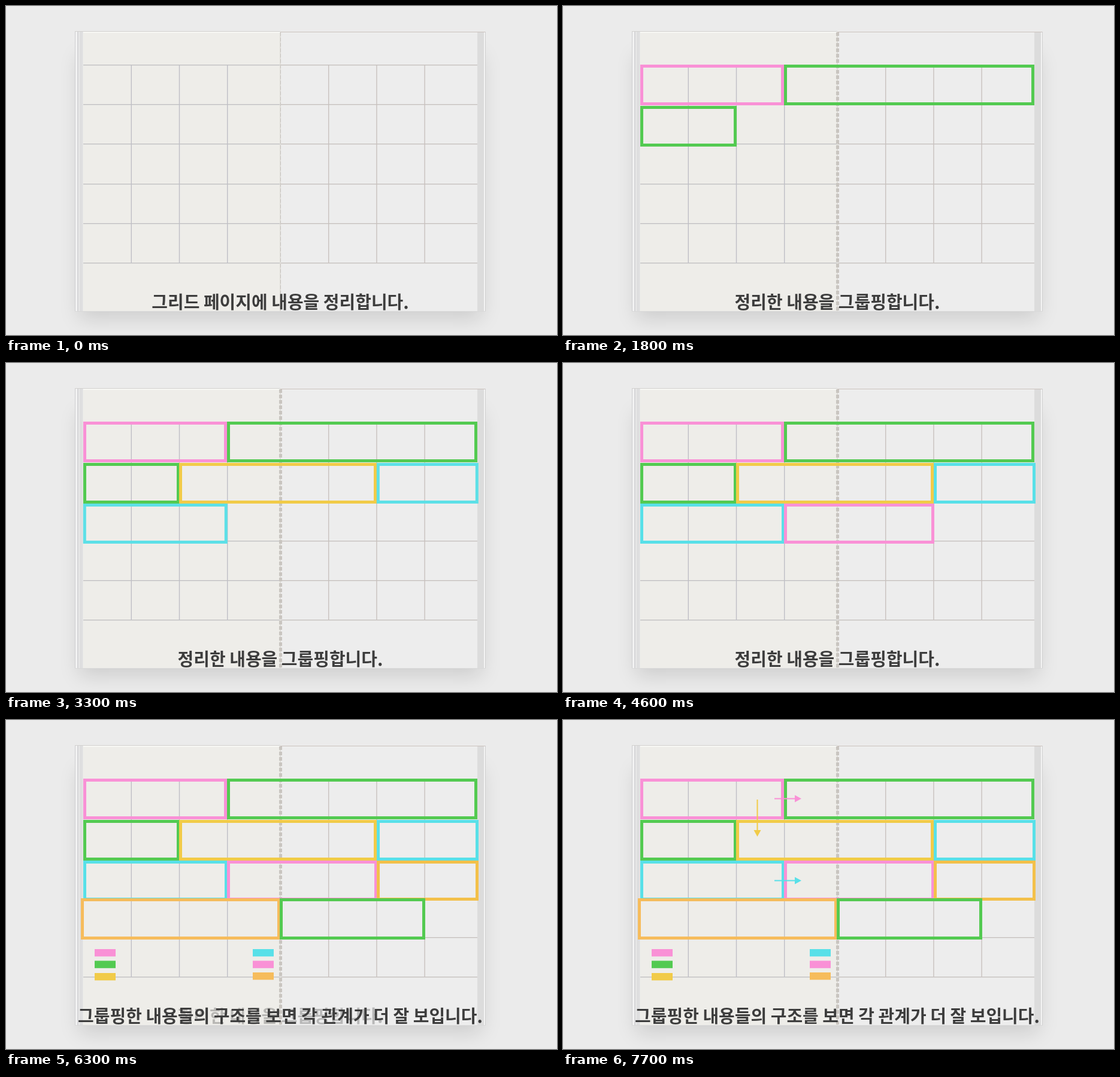
Animation of 920x550 px, one loop 7800 ms. Source, as an HTML page with a canvas:

```html
<!DOCTYPE html>
<html lang="ko">
<head>
<meta charset="utf-8">
<title>그리드 페이지</title>
<style>
  html, body { margin: 0; width: 100%; height: 100%; overflow: hidden; background: #ebebeb; }
  canvas { display: block; width: 920px; height: 550px; }
</style>
</head>
<body>
<canvas id="stage" width="920" height="550"></canvas>
<script>
const ctx = document.getElementById('stage').getContext('2d');
const LOOP = 7800, STEP = 100;
const PINK = '#f991d6', GREEN = '#53ca51', YELLOW = '#f1cb48', GOLD = '#f3c04a',
      ORANGE = '#f6bc5c', CYAN = '#58e0e8';

// Outer edges of each group, with the time it starts to appear
const groups = [
  { start: 500, color: PINK, box: [129, 98, 369, 166], slide: 0 },
  { start: 1200, color: GREEN, box: [369, 98, 787, 166], slide: 5 },
  { start: 1200, color: GREEN, box: [129, 167, 290, 235], slide: 5 },
  { start: 2000, color: YELLOW, box: [289, 167, 619, 235], slide: 5 },
  { start: 2900, color: CYAN, box: [619, 167, 789, 235], slide: 5 },
  { start: 2900, color: CYAN, box: [129, 235, 370, 302], slide: 5 },
  { start: 3750, color: PINK, box: [369, 235, 620, 302], slide: 5 },
  { start: 4600, color: GOLD, box: [619, 235, 789, 302], slide: 5 },
  { start: 4600, color: ORANGE, box: [125, 298, 458, 367], slide: 5 },
  { start: 5350, color: GREEN, box: [457, 298, 700, 367], slide: 5 }
];

const captions = [
  { text: '그리드 페이지에 내용을 정리합니다.', from: -500, to: 100, fade: 500 },
  { text: '정리한 내용을 그룹핑합니다.', from: 100, to: 5950, fade: 500 },
  { text: '그룹핑한 내용들의 구조를 보면 각 관계가 더 잘 보입니다.', from: 5950, to: 9000, fade: 350 }
];

const swatches = [
  [148, 383, PINK], [148, 402.5, GREEN], [148, 423, YELLOW],
  [412, 383, CYAN], [412, 402.5, PINK], [412, 422, ORANGE]
];

const ramp = (t, start, length) => Math.min(1, Math.max(0, (t - start) / length));
const easeOut = p => 1 - (1 - p) ** 2;

function fill(color, x, y, w, h) {
  ctx.fillStyle = color;
  ctx.fillRect(x, y, w, h);
}

function drawPage() {
  fill('#ebebeb', 0, 0, 920, 550);
  ctx.save();
  ctx.shadowColor = 'rgba(0,0,0,0.13)';
  ctx.shadowBlur = 32;
  ctx.shadowOffsetY = 13;
  fill('#e9e9e9', 122, 70, 672, 440);
  ctx.restore();

  // Stacked sheet edges on both sides
  fill('#e8e8e8', 115, 43, 14, 467);
  fill('#cfcfd1', 115, 43, 1, 467);
  fill('#f2f2f2', 116, 43, 3, 467);
  fill('#d5d5d7', 119, 43, 2, 467);
  fill('#dededf', 123, 43, 5, 467);
  fill('#dcdcdc', 787, 43, 11, 467);
  fill('#f3f3f3', 798, 43, 2, 467);
  fill('#cfcfcf', 800, 43, 1, 467);

  fill('#eeede9', 129, 43, 329, 467);
  fill('#ededed', 458, 43, 329, 467);
  fill('#d2d1cf', 115, 42, 343, 1);
  fill('#f7f7f4', 129, 43, 329, 2);
  fill('#cbc2bd', 458, 43, 342, 1);
  fill('#d9d9d9', 115, 510, 686, 1);
}

function drawGrid() {
  for (let i = 0; i < 6; i++) {
    const y = 98 + Math.round(i * 66.2);
    fill('#c1c0c2', 129, y, 329, 1.4);
    fill('#c6c1be', 458, y, 329, 1.4);
  }
  for (let i = 0; i < 3; i++) {
    fill('#bfbfc6', 208.6 + i * 80.2, 99, 1.4, 331);
    fill('#c8c1be', 538 + i * 80.2, 99, 1.4, 331);
  }
  fill('#dedcd8', 457, 44, 2, 466);
  ctx.save();
  ctx.strokeStyle = '#c9c5c0';
  ctx.setLineDash([6, 3]);
  ctx.beginPath();
  ctx.moveTo(458.5, 44);
  ctx.lineTo(458.5, 510);
  ctx.stroke();
  ctx.restore();
}

function drawGroup({ start, color, box, slide }, t) {
  const p = ramp(t, start, 500);
  if (!p) return;
  const [x1, y1, x2, y2] = box;
  const shift = slide * (1 - easeOut(p));
  ctx.globalAlpha = easeOut(p);
  ctx.strokeStyle = color;
  ctx.lineWidth = 5;
  ctx.strokeRect(x1 + 2.5 - shift, y1 + 2.5, x2 - x1 - 5, y2 - y1 - 5);
  ctx.globalAlpha = 1;
}

function drawArrow(x, y, length, angle, color) {
  ctx.save();
  ctx.translate(x, y);
  ctx.rotate(angle);
  fill(color, 0, -1, length - 9, 2);
  ctx.beginPath();
  ctx.moveTo(length, 0);
  ctx.lineTo(length - 11, -6);
  ctx.lineTo(length - 11, 6);
  ctx.fill();
  ctx.restore();
}

function drawArrows(t) {
  ctx.globalAlpha = ramp(t, 6700, 500);
  drawArrow(353, 131.5, 45, 0, PINK);
  drawArrow(324.5, 133, 62, Math.PI / 2, YELLOW);
  drawArrow(353, 268.5, 45, 0, CYAN);
  ctx.globalAlpha = 1;
}

function drawCaption({ text, from, to, fade }, t) {
  const alpha = ramp(t, from, fade) * (1 - ramp(t, to, fade));
  if (!alpha) return;
  ctx.globalAlpha = alpha;
  ctx.fillStyle = '#3d3d3d';
  ctx.fillText(text, 458, 506);
  ctx.globalAlpha = 1;
}

function draw(t) {
  drawPage();
  drawGrid();
  groups.forEach(g => drawGroup(g, t));
  ctx.globalAlpha = ramp(t, 5900, 300);
  swatches.forEach(([x, y, color]) => fill(color, x, y, 35, 12.3));
  ctx.globalAlpha = 1;
  drawArrows(t);
  ctx.font = 'bold 29px "Noto Sans CJK KR", "Noto Sans CJK JP", "Noto Sans CJK", sans-serif';
  ctx.textAlign = 'center';
  captions.forEach(c => drawCaption(c, t));
}

const origin = performance.now();
function tick() {
  const now = Math.max(0, performance.now() - origin) % LOOP;
  const t = Math.floor(now / STEP) * STEP;
  // The opening pictures are held for two steps each
  draw(t < 400 ? Math.floor(t / 200) * 200 : t);
  requestAnimationFrame(tick);
}
tick();
</script>
</body>
</html>
```
